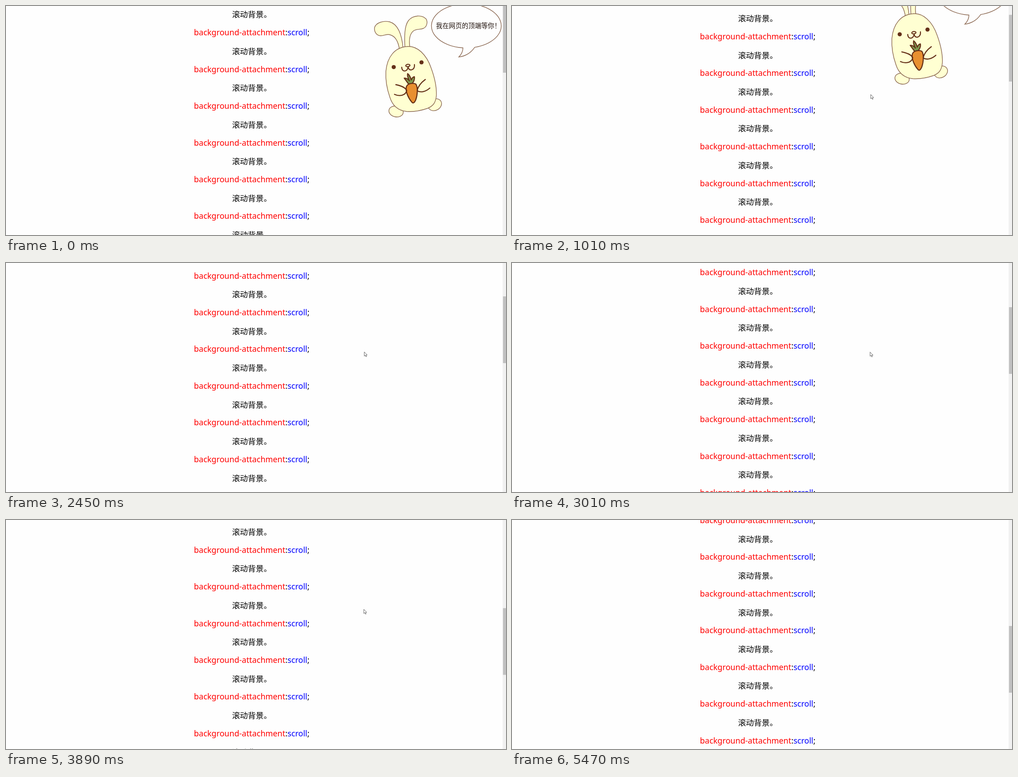
An HTML page for the animation above (6.18 s loop, 1103x508 px).

```html
<!DOCTYPE html>
<html lang="zh-CN">
<head>
<meta charset="utf-8">
<title>background-attachment: scroll</title>
<style>
  html, body { margin: 0; width: 100%; height: 100%; overflow: hidden; background: #fefefe; }
  svg { display: block; }
  text { font-family: "Noto Sans CJK SC", "Noto Sans CJK", sans-serif; }
  .zh { font-size: 17.45px; }
  .code { font-family: "Noto Sans", "Open Sans", sans-serif; font-size: 17.7px; }
  .prop { fill: #f00; }
  .value { fill: #00f; }
  .skin { fill: #ffffd2; stroke: #8a6750; stroke-width: 1.4; }
  .ink { fill: none; stroke: #643018; stroke-width: 2.3; stroke-linecap: round; stroke-linejoin: round; }
  .leaf { fill: #7d9a4f; }
  .carrot { fill: #e88f30; }
  .eye { fill: #643018; }
</style>
</head>
<body>
<svg width="1103" height="508" viewBox="0 0 1103 508">
  <rect width="1103" height="508" fill="#fefefe"/>
  <g id="page">
    <g id="rabbit">
      <path class="skin" d="M868 97C866 82 861 67 846 63.5C838 62 835 66 826 66C816 65 812 56 813 48C816 37 832 32 846 35C864 40 873 60 876 94"/>
      <path class="skin" d="M880 93C879 72 878 45 888 32C898 20 918 19 927 29C931 37 928 47 920 50C912 53 905 50 898 56C890 63 889 78 891 92"/>
      <ellipse class="skin" cx="860.5" cy="234" rx="16" ry="12" transform="rotate(12 860.5 234)"/>
      <ellipse class="skin" cx="946" cy="219" rx="15.5" ry="12.5" transform="rotate(-30 946 219)"/>
      <path class="skin" d="M884 90C907 87 928 108 938 138C946 160 950 182 949.5 198C948 215 942 222 930 227C916 232 900 235 884 234C865 232 853 222 847 203C840 183 837 163 838 145C841 112 858 92 884 90Z"/>
      <circle class="eye" cx="855.3" cy="135.5" r="4.6"/>
      <circle class="eye" cx="916.6" cy="125" r="4.6"/>
      <ellipse class="ink" cx="886.5" cy="132" rx="4.6" ry="2.6" transform="rotate(-8 886.5 132)"/>
      <path class="ink" d="M873 136C873 147 886 147 887 135C888 146 903 143 901 130"/>
      <path class="ink leaf" d="M888 173L878.5 160C884 160 888 163 890 166C886 159 885 154 886 150C891 154 893 160 894 164C896 159 899 157 901 157C902 164 898 170 895 173Z"/>
      <path class="ink carrot" d="M883 180C885 172 896 170 904 173C909 180 908 197 904 208C901 215 898 217 895 213C888 205 881 190 883 180Z"/>
      <path class="ink" d="M860 174.5C872 177 880 180 884 187C882 199 868 201 857 196M925 163C914 171 909 178 907 188C915 193 926 190 935 182"/>
    </g>
    <path d="M1034 91.6A77 49 0 1 0 1008 92.8C1008 100 1005 107 999 113C1015 111 1027 102 1034 91.6Z" fill="#fefefe" stroke="#8a6750" stroke-width="1.4"/>
    <text x="948.5" y="49.3" font-size="14.3" font-weight="500" fill="#22140e">我在网页的顶端等你！</text>
    <g id="lines"></g>
  </g>
  <rect x="1095.5" width="7.5" height="508" fill="#f1f1f1"/>
  <rect id="thumb" x="1096.3" width="6.7" height="148" fill="#c1c1c1"/>
  <path id="cursor" d="M.5 .5V9.8L2.6 7.9L4.2 11.3L5.6 10.7L4.1 7.4H7Z" fill="#fff" stroke="#555" stroke-width=".9"/>
</svg>
<script>
  const LOOP = 6180;
  const TICK = LOOP / 43;          // the screen refreshes 43 times per loop
  const TICK_LEAD = 20;
  const LINE_GAP = 112 * 8 / 11;   // CSS pixels at the page's zoom
  const NOTCH = 100 * 8 / 11;
  const THUMB_RATIO = 0.2694;
  const GLIDE = 1.88;              // ticks one wheel notch takes to settle

  // Moments, in ticks, at which the wheel turns by one notch.
  const wheelTurns = [5, 9, 13, 16, 18.2, 21, 22.4, 23.1, 25, 25.4, 28, 34];

  const $ = id => document.getElementById(id);
  const clamp = v => Math.min(1, Math.max(0, v));
  const easeOut = u => 1 - (1 - clamp(u)) ** 2;

  const scrollAt = tick =>
    NOTCH * wheelTurns.reduce((sum, turn) => sum + easeOut((tick - turn) / GLIDE), 0);

  // The pointer darts in, drifts slowly while scrolling, then darts out.
  function cursorAt(tick) {
    if (tick < 2 || tick > 37) return null;
    if (tick === 2) return [876, 338];
    if (tick === 37) return [986, 494];
    const drift = clamp((tick - 3) / 29);
    return [791.3 - 3 * drift, 195.5 + 2.5 * drift];
  }

  $('lines').innerHTML = Array.from({ length: 20 }, (_, i) => {
    const y = i * LINE_GAP;
    return `<text class="zh" x="498.7" y="${y + 25.4}">滚动背景。</text>
      <text class="code" x="414.6" y="${y + 65.2}"><tspan class="prop">background-attachment</tspan>:<tspan class="value">scroll</tspan>;</text>`;
  }).join('');

  function draw(t) {
    const tick = Math.floor((t + TICK_LEAD) / TICK);
    const scroll = scrollAt(tick);
    $('page').setAttribute('transform', `translate(0 ${-scroll})`);
    $('thumb').setAttribute('y', scroll * THUMB_RATIO);

    const position = cursorAt(tick);
    $('cursor').setAttribute('visibility', position ? 'visible' : 'hidden');
    if (position) $('cursor').setAttribute('transform', `translate(${position.join(' ')})`);
  }

  const start = performance.now();
  function animate() {
    draw((performance.now() - start) % LOOP);
    requestAnimationFrame(animate);
  }
  animate();
</script>
</body>
</html>
```
